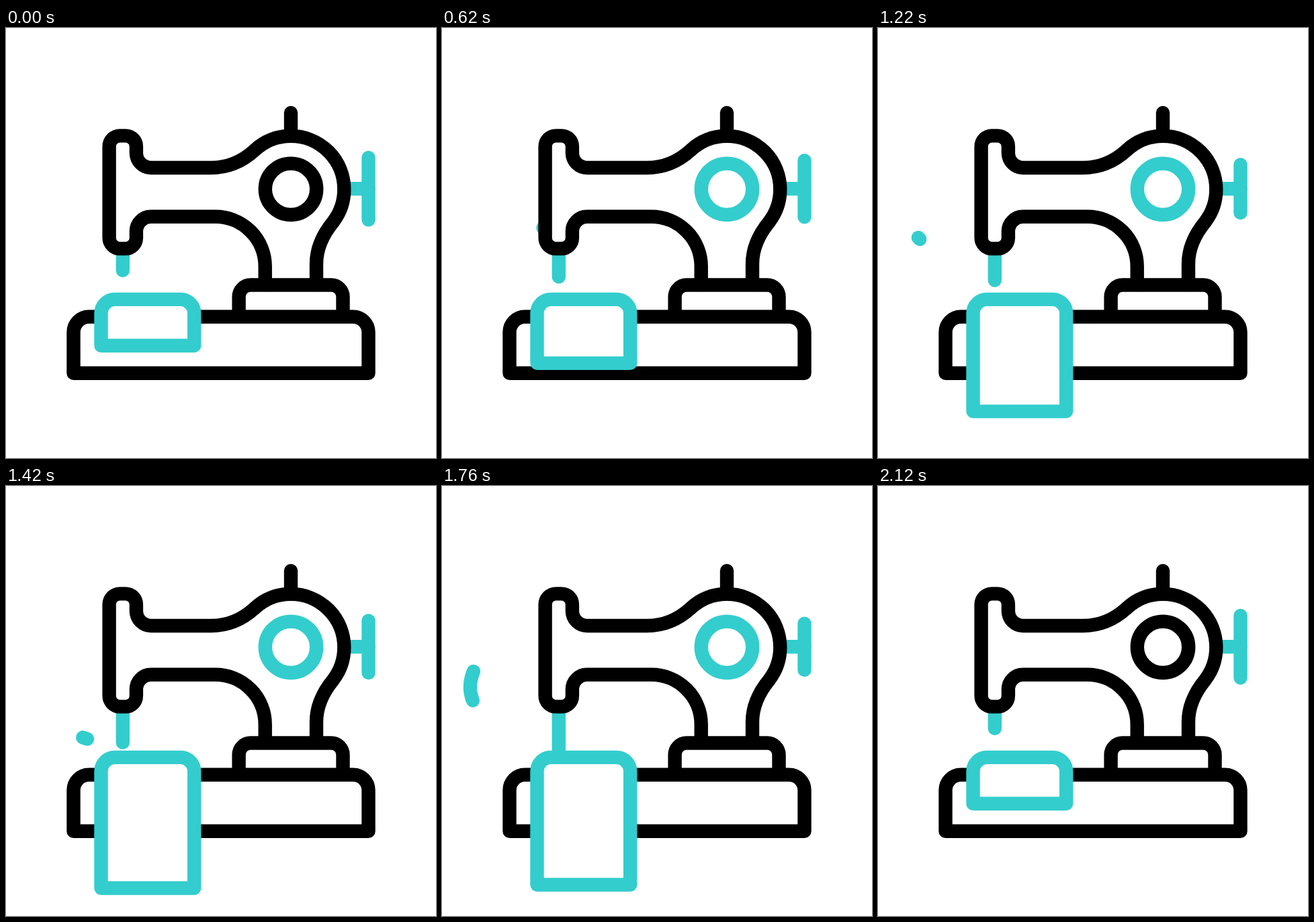
Animation, 640 px wide and 640 px high, one loop 2.4 s. Source, as an HTML page with a canvas:

```html
<!DOCTYPE html>
<html lang="en">
<head>
<meta charset="utf-8">
<title>Sewing machine</title>
<style>
html, body { margin: 0; width: 100%; height: 100%; overflow: hidden; background: #fff; }
canvas { display: block; width: 100vmin; height: 100vmin; }
</style>
</head>
<body>
<canvas id="stage" width="640" height="640"></canvas>
<script>
const ctx = document.getElementById('stage').getContext('2d');
const LOOP = 2400, STEP = 20, REST = 2120, BEAT = 520;
const TEAL = [51, 205, 205];
const teal = `rgb(${TEAL})`;

// Progress from 0 to 1 between times a and b, linear or eased.
const ramp = (t, a, b) => Math.min(1, Math.max(0, (t - a) / (b - a)));
const ease = (t, a, b) => (1 - Math.cos(Math.PI * ramp(t, a, b))) / 2;

// The cloth is fed in three pulls, then springs back.
const clothEnd = t => 483 + 22.5 * ease(t, 190, 560) + 61.5 * ease(t, 560, 943)
  + 45 * ease(t, 1055, 1495) - 129 * ease(t, 1690, REST);

// One quick stitch, then a slow one.
const needleTip = t => 371 + 32 * (ramp(t, 0, 340) - ramp(t, 340, 740)
  + ramp(t, 740, 1780) - ramp(t, 1780, REST));

const wheelHalf = t => 56.5 - 6.7 * (1 - Math.cos(2 * Math.PI * Math.min(t / BEAT, 4)));
const ringTint = t => ramp(t, 0, 240) - ramp(t, 1840, REST);

// Loose thread ends that fly along a cubic curve.
const threads = [
  { start: 600, time: 311, curve: [153, 300, 140, 286, 124, 273, 104, 259] },
  { start: 875, time: 352, curve: [137, 362, 78, 350, 75, 327, 59, 311] },
  { start: 1405, time: 416, curve: [121, 376.5, 57.5, 357.5, 15, 307.5, 62, 252] }
];

const body = new Path2D(
  'M385.7 382 V355 A74 74 0 0 0 311.5 280.8 H216 A22 22 0 0 0 193.9 303' +
  ' V312.5 A16 16 0 0 1 178 328.4 H169.5 A16 16 0 0 1 153.6 312.5' +
  ' V176.3 A16 16 0 0 1 169.5 160.4 H178 A16 16 0 0 1 193.9 176.3' +
  ' V186 A22 22 0 0 0 216 208 H305 C329 208 352 198.5 370 182' +
  ' A79.3 79.3 0 0 1 424 160.8 A79.3 79.3 0 0 1 503.3 240.1' +
  ' A79.3 79.3 0 0 1 487 288.5 C471 308 462 329 462 351 V382');
const base = new Path2D(
  'M100.5 513.7 V452.8 A23 23 0 0 1 123.5 429.8 H516.5 A23 23 0 0 1 539.5 452.8 V513.7 Z');
const collar = new Path2D(
  'M346.6 429.8 V400 A17.5 17.5 0 0 1 364 382.5 H484 A17.5 17.5 0 0 1 501.5 400 V429.8');
const post = new Path2D('M424 126.2 V159');

function draw(path, color) {
  ctx.strokeStyle = color;
  ctx.stroke(path);
}

function line(x0, y0, x1, y1, color) {
  draw(new Path2D(`M${x0} ${y0} L${x1} ${y1}`), color);
}

function point(c, u) {
  const v = 1 - u, w = [v * v * v, 3 * v * v * u, 3 * v * u * u, u * u * u];
  const sum = k => w.reduce((s, f, i) => s + f * c[2 * i + k], 0);
  return [sum(0), sum(1)];
}

// The tail starts slowly and catches up with the head.
function drawThread({ start, time, curve }, t) {
  const head = ramp(t, start, start + time), tail = head ** 3.6;
  if (head <= tail) return;
  const path = new Path2D();
  for (let i = 0; i <= 24; i++) path.lineTo(...point(curve, tail + (head - tail) * i / 24));
  draw(path, teal);
}

function drawCloth(t) {
  const end = clothEnd(t) - 10.3;
  const sheet = new Path2D(
    `M141.5 ${end} V424.5 A20.5 20.5 0 0 1 162 403.9 H259.7 A20.5 20.5 0 0 1 280.2 424.5 V${end} Z`);
  ctx.fillStyle = '#fff';
  ctx.fill(sheet);
  draw(sheet, teal);
}

function render(t) {
  ctx.fillStyle = '#fff';
  ctx.fillRect(0, 0, 640, 640);
  ctx.lineWidth = 20.4;
  ctx.lineCap = ctx.lineJoin = 'round';

  const half = wheelHalf(t) - 10.2;
  line(505, 239.3, 539.5, 239.3, teal);
  line(539.5, 239.3 - half, 539.5, 239.3 + half, teal);
  line(173.8, 330, 173.8, needleTip(t) - 10.2, teal);
  threads.forEach(th => drawThread(th, t));

  [base, collar, post, body].forEach(p => draw(p, '#000'));

  const ring = new Path2D();
  ring.arc(424, 239.8, 38.2, 0, 2 * Math.PI);
  draw(ring, `rgb(${TEAL.map(c => Math.round(c * ringTint(t)))})`);

  drawCloth(t);
}

const begin = performance.now();
function frame() {
  const t = (performance.now() - begin) % LOOP;
  render(Math.min(REST, Math.floor(t / STEP) * STEP));
  requestAnimationFrame(frame);
}
frame();
</script>
</body>
</html>
```
